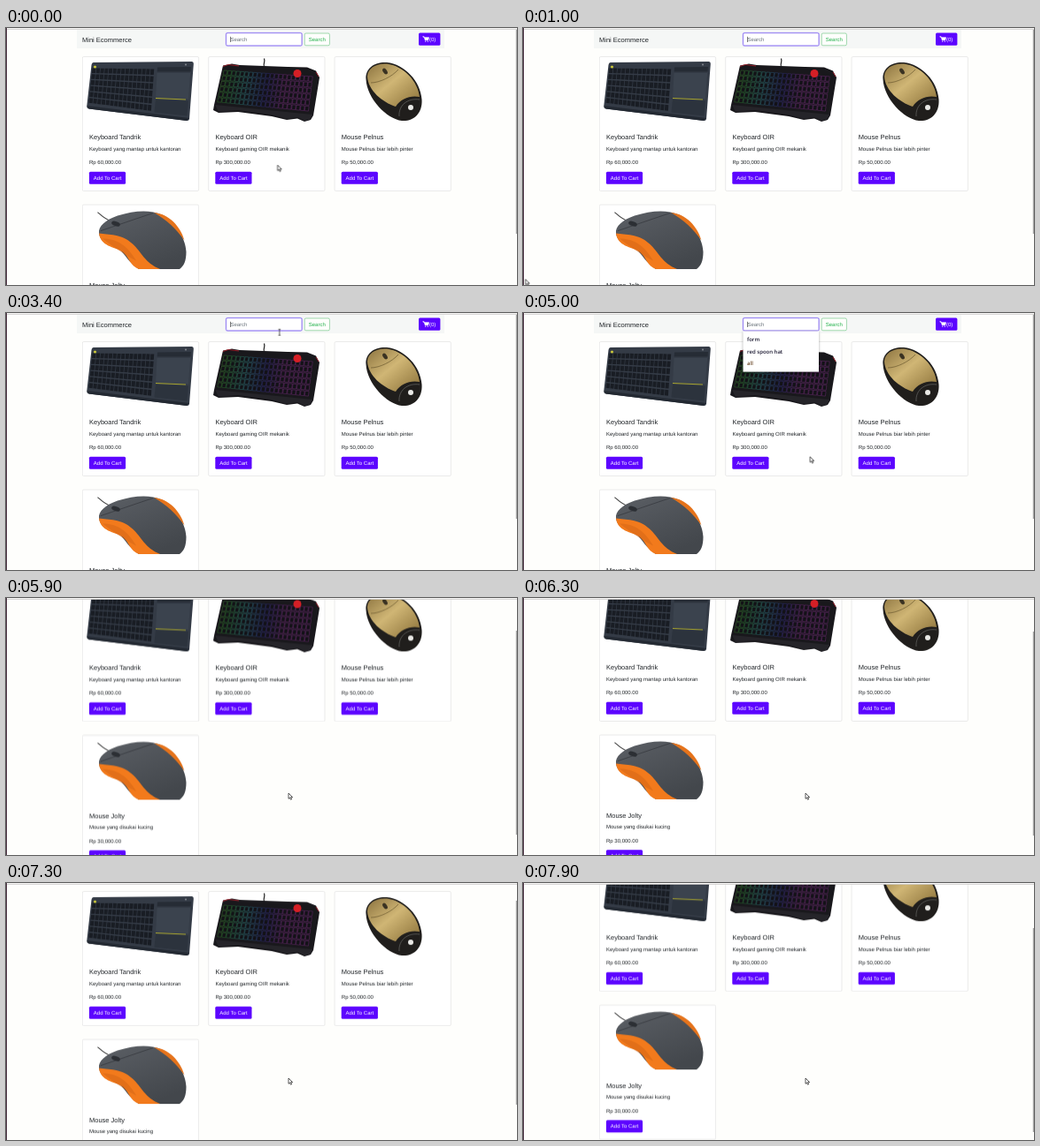
An HTML page for the animation above (8 s loop, 577x291 px).

```html
<!DOCTYPE html>
<html lang="id">
<head>
<meta charset="utf-8">
<title>Mini Ecommerce</title>
<style>
html, body { margin: 0; width: 100%; height: 100%; overflow: hidden; background: #fefefc; }
svg { display: block; width: 577px; height: 291px; }
text { font: 6px "Liberation Sans", Arial, sans-serif; fill: #212529; text-rendering: geometricPrecision; }
.big { font-size: 7.5px; }
.light { fill: #fff; }
.mid { text-anchor: middle; }
.hint { fill: #6c757d; }
.menu text { font: 600 6px "Open Sans", "Noto Sans", sans-serif; fill: #1d1b33; }
.menu rect { filter: drop-shadow(0 1px 1.5px rgba(0, 0, 0, .35)); }
.card { fill: #fff; stroke: #dcdcdc; stroke-width: .6; }
.buy { fill: #5c05ff; }

.page, .thumb, .menu, .focus, .caret, .arrow, .beam { animation: 8s step-end infinite; }
.page { animation-name: scroll; }
.thumb { animation-name: thumb; }
.menu { animation-name: menu; }
.focus { animation-name: focus; }
.caret { animation: blink 1.2s step-end infinite -.9s; }
.arrow { animation-name: arrow; }
.beam { animation-name: beam; }
.pointer { animation: move 8s linear infinite; }
.find rect { animation: fill 8s linear infinite; }
.find text { animation: label 8s linear infinite; }

@keyframes scroll {
  0% { transform: none; }
  73.65% { transform: translateY(-44.6px); }
  74.9% { transform: translateY(-66px); }
  76.15% { transform: translateY(-74px); }
  78.65% { transform: translateY(-45.1px); }
  79.9% { transform: translateY(-10px); }
  81.15% { transform: none; }
  91.15% { transform: translateY(-22.9px); }
  92.4% { transform: translateY(-61px); }
  93.65% { transform: translateY(-74px); }
  98.65%, 100% { transform: translateY(-61.8px); }
}
/* The bar moves .79 of the page distance. */
@keyframes thumb {
  0% { transform: none; }
  73.65% { transform: translateY(35px); }
  74.9% { transform: translateY(52px); }
  76.15% { transform: translateY(58px); }
  78.65% { transform: translateY(35.5px); }
  79.9% { transform: translateY(8px); }
  81.15% { transform: none; }
  91.15% { transform: translateY(18px); }
  92.4% { transform: translateY(48px); }
  93.65% { transform: translateY(58px); }
  98.65%, 100% { transform: translateY(49px); }
}
@keyframes move {
  0% { transform: translate(307px, 155px); }
  7.5% { transform: translate(60px, 268px); }
  11.25%, 12.5% { transform: translate(2px, 285px); }
  18.75% { transform: translate(346px, 12px); }
  20.5% { transform: translate(348px, 12px); }
  23.75% { transform: translate(303.5px, 119px); }
  26.25%, 27.5% { transform: translate(337px, 118px); }
  38.75% { transform: translate(322px, 35px); }
  45%, 58.75% { transform: translate(300px, 13px); }
  62.5% { transform: translate(323.5px, 162.5px); }
  65.5% { transform: translate(466px, 205px); }
  70%, 100% { transform: translate(319px, 221px); }
}
@keyframes blink { 0% { opacity: 0; } 50%, 100% { opacity: 1; } }
@keyframes menu { 0% { opacity: 0; } 51.15% { opacity: .6; } 52.4% { opacity: 1; } 65%, 100% { opacity: 0; } }
@keyframes focus { 0% { opacity: 1; } 65%, 100% { opacity: 0; } }
@keyframes arrow { 0% { opacity: 1; } 42.5% { opacity: 0; } 59.4%, 100% { opacity: 1; } }
@keyframes beam { 0% { opacity: 0; } 42.5% { opacity: 1; } 59.4%, 100% { opacity: 0; } }
@keyframes fill { 0%, 18% { fill: #fefefc; } 19%, 20.6% { fill: #28a745; } 21.8%, 100% { fill: #fefefc; } }
@keyframes label { 0%, 18% { fill: #22b24c; } 19%, 20.6% { fill: #fff; } 21.8%, 100% { fill: #22b24c; } }
</style>
</head>
<body>
<svg id="stage" viewBox="0 0 577 291"></svg>
<script>
const poly = (pts, attrs) => `<polygon points="${pts.join(' ')}" ${attrs}/>`;
const path = (d, attrs) => `<path d="${d}" ${attrs}/>`;
const text = (x, y, s, cls = '') => `<text x="${x}" y="${y}" class="${cls}">${s}</text>`;
const box = (x, y, w, h, attrs) => `<rect x="${x}" y="${y}" width="${w}" height="${h}" ${attrs}/>`;
const dot = (x, y, r, fill) => `<circle cx="${x}" cy="${y}" r="${r}" fill="${fill}"/>`;

// Keys laid out on a four-cornered plane: corners run clockwise from top left.
function keys(corners, cols, rows, attrs) {
  const [a, b, c, d] = corners;
  const at = (u, v) => [0, 1].map(i =>
    ((a[i] * (1 - u) + b[i] * u) * (1 - v) + (d[i] * (1 - u) + c[i] * u) * v).toFixed(2));
  let out = '';
  for (let r = 0; r < rows; r++) {
    for (let k = 0; k < cols; k++) {
      const u = k / cols, v = r / rows, du = .84 / cols, dv = .8 / rows;
      out += poly([at(u, v), at(u + du, v), at(u + du, v + dv), at(u, v + dv)], attrs(u));
    }
  }
  return out;
}

const slimBoard = () =>
  path('M99 39L209.5 38Q212 38 211.8 41L207 103Q206.5 105.5 204 105L93.5 91.5Q91 91 91.3 88L96.5 42Q97 39 99 39Z', 'fill="#343b46"') +
  path('M91.3 88L207 102L204 105L93.5 91.5Z', 'fill="#232932"') +
  keys([[97.5, 45.5], [168, 46.5], [164.5, 95.5], [93.5, 86]], 15, 6, () => 'fill="#191d24"') +
  poly([[171, 44.5], [209, 44], [208.5, 49.5], [170.6, 49.5]], 'fill="#262c35"') +
  poly([[170.5, 51], [208.2, 51], [206, 80.5], [169, 79]], 'fill="#3b434e"') +
  poly([[169, 81], [206, 82.5], [204.5, 99.5], [167.5, 95.5]], 'fill="#2c333d"') +
  path('M169 79.5L203 81', 'stroke="#b5b02c" stroke-width=".9"') +
  dot(100.5, 44, 1.6, '#c9c63a') + dot(203, 41.5, .9, '#8b9096');

const glowBoard = () =>
  path('M291.5 43C290 41 293 39 291.5 34.5', 'fill="none" stroke="#222" stroke-width="1.2"') +
  poly([[245, 42.5], [255, 40.5], [264, 42], [318, 44], [340, 44.5], [350, 48.5], [354, 56], [347, 99], [344, 104],
    [337, 106], [329, 102.5], [317, 104], [300, 100], [262, 95], [240, 96], [234, 93], [235, 87]], 'fill="#19181c"') +
  poly([[236, 87], [346, 98], [343, 104], [337, 105], [329, 101], [317, 103], [300, 98], [262, 93], [240, 95]], 'fill="#252429"') +
  path('M245 43.5L251 41.5L263 43M350 50L353 55', 'fill="none" stroke="#b3202c" stroke-width=".8"') +
  keys([[246, 48], [347, 55], [342, 95.5], [238.5, 85]], 21, 6,
    u => `fill="#131217" stroke="hsl(${Math.round(110 + 185 * Math.min(1, u * 1.5))} 50% 42%)" stroke-width=".45" stroke-opacity=".7"`) +
  dot(329, 51.5, 4.5, '#d51f26');

const goldMouse = () =>
  path('M406.5 58C405.5 45 417 38 430 39C450 41 468 60 469.5 81C470.5 97 460 106 447 105C430 103 407.5 80 406.5 58Z', 'fill="#201e1c"') +
  path('M408 55C408 45 419 39.5 430 40.5C449 43 465 60 467 78C456 76 446 80 440 89C425 84 409 71 408 55Z', 'fill="url(#gold)"') +
  path('M412 62C422 62 436 55 443 47', 'fill="none" stroke="#5d4c25" stroke-width=".6"') +
  path('M444 100C443 88 453 79 467 81', 'fill="none" stroke="#6b6a68" stroke-width=".7"') +
  `<ellipse cx="428" cy="49" rx="2.2" ry="3.8" fill="#3a3222" transform="rotate(-35 428 49)"/>` +
  dot(457, 90, 3, '#e9e9e6');

const sportMouse = () =>
  path('M103.5 41C107 44 110 48 122 53', 'fill="none" stroke="#444" stroke-width="1.1"') +
  path('M105 65C104 57 112 50 126 45C145 39 163 38 176 44C192 53 203 71 203.5 86C203.5 96 201 102 196 105.3L150 105.3C139 99 134 88 128 83C118 79 107 77 105 65Z', 'fill="url(#slate)"') +
  path('M105 65C116 67 130 65 143 77C153 86 157 99 174 105.3L150 105.3C140 102 139 92 132 86C122 80 107 80 105 65Z', 'fill="#f27a1c"') +
  path('M109 71C124 71 136 77 147 96C134 90 120 79 109 71Z', 'fill="#c95f14" opacity=".4"') +
  path('M167 41.5C184 43 197 57 201.5 73C192 60 182 50 167 41.5Z', 'fill="#e5731b"') +
  path('M107 62C122 57 145 49 166 42', 'fill="none" stroke="#33363b" stroke-width=".7"') +
  `<ellipse cx="124" cy="54" rx="5" ry="2.6" fill="#2c2f34" transform="rotate(18 124 54)"/>`;

// Every card is drawn at row zero, its picture in page columns.
function card(col, row, name, about, price, picture) {
  const x = 86.3 + col * 142.4;
  return `<g transform="translate(0 ${row * 167.6})">` +
    box(x, 32.5, 131.3, 152, 'rx="1.5" class="card"') + picture() +
    text(x + 7.7, 126.2, name, 'big') + text(x + 7.7, 138.8, about) + text(x + 7.7, 154, price) +
    box(x + 7.6, 162.7, 41.2, 14, 'rx="1.5" class="buy"') +
    text(x + 28.3, 171.7, 'Add To Cart', 'light mid') + '</g>';
}

const header =
  box(80, 2, 415, 21, 'fill="#f5f7f6"') + text(86, 15.5, 'Mini Ecommerce', 'big') +
  box(248.6, 5.7, 85.4, 14.2, 'rx="1.5" fill="#fff" stroke="#ced4da" stroke-width=".5"') +
  `<g class="focus">` +
  box(248.4, 5.5, 85.8, 14.6, 'rx="1.8" fill="none" stroke="#b9a3ff" stroke-width="1.6" opacity=".6"') +
  box(248.6, 5.7, 85.4, 14.2, 'rx="1.5" fill="#fff" stroke="#8069ee" stroke-width=".8"') +
  `<g class="caret">${box(253.2, 9.8, .6, 6.2, 'fill="#222"')}</g></g>` +
  text(253.4, 15, 'Search', 'hint') +
  `<g class="find">${box(337.2, 6, 28.2, 13.8, 'rx="1.5" stroke="#45b45f" stroke-width=".5"')}${text(351.3, 14.9, 'Search', 'mid')}</g>` +
  box(466, 5.6, 24.4, 14.2, 'rx="1.5" class="buy"') +
  path('M470.6 9.8H472.1L473.2 13.8H476.7L477.6 10.7H472.5Z', 'fill="#fff" stroke="#fff" stroke-width=".6"') +
  dot(473.7, 15.1, .7, '#fff') + dot(476.3, 15.1, .7, '#fff') + text(478, 14.9, '(0)', 'light');

const menu = `<g class="menu">` + box(248.5, 20.6, 85.5, 46, 'fill="#fff"') +
  text(253, 32, 'form') + text(253, 45.7, 'red spoon hat') +
  `<text x="253" y="59.2" style="fill:#65401f">all</text></g>`;

const pointer = `<g class="pointer"><g class="arrow">` +
  path('M0 0V6.3L1.5 5L2.5 7.3L3.6 6.8L2.6 4.6H4.6Z', 'fill="#fff" stroke="#222" stroke-width=".75"') + '</g><g class="beam">' +
  path('M-1.3 -3.3H1.3M0 -3.3V3.3M-1.3 3.3H1.3', 'fill="none" stroke="#222" stroke-width=".7"') + '</g></g>';

document.getElementById('stage').innerHTML =
  `<defs><linearGradient id="gold" x2="1" y2="1"><stop stop-color="#8c7440"/><stop offset=".45" stop-color="#d0b675"/><stop offset="1" stop-color="#8a7038"/></linearGradient>
  <linearGradient id="slate" x2=".6" y2="1"><stop stop-color="#5b5f65"/><stop offset="1" stop-color="#43474c"/></linearGradient></defs>` +
  box(0, 0, 577, 291, 'fill="#fefefc"') +
  `<g class="page">` + header +
  card(0, 0, 'Keyboard Tandrik', 'Keyboard yang mantap untuk kantoran', 'Rp 60,000.00', slimBoard) +
  card(1, 0, 'Keyboard OIR', 'Keyboard gaming OIR mekanik', 'Rp 300,000.00', glowBoard) +
  card(2, 0, 'Mouse Pelnus', 'Mouse Pelnus biar lebih pinter', 'Rp 50,000.00', goldMouse) +
  card(0, 1, 'Mouse Jolty', 'Mouse yang disukai kucing', 'Rp 30,000.00', sportMouse) + '</g>' +
  menu +
  box(0, 0, 577, 1.2, 'fill="#f4f3f2"') + box(0, 1.2, 577, .8, 'fill="#cfcdcc"') +
  box(0, 0, 1, 291, 'fill="#43283a"') +
  `<g class="thumb">${box(575.8, 2, 1.2, 231, 'fill="#a3a3a3"')}</g>` +
  pointer;
</script>
</body>
</html>
```
